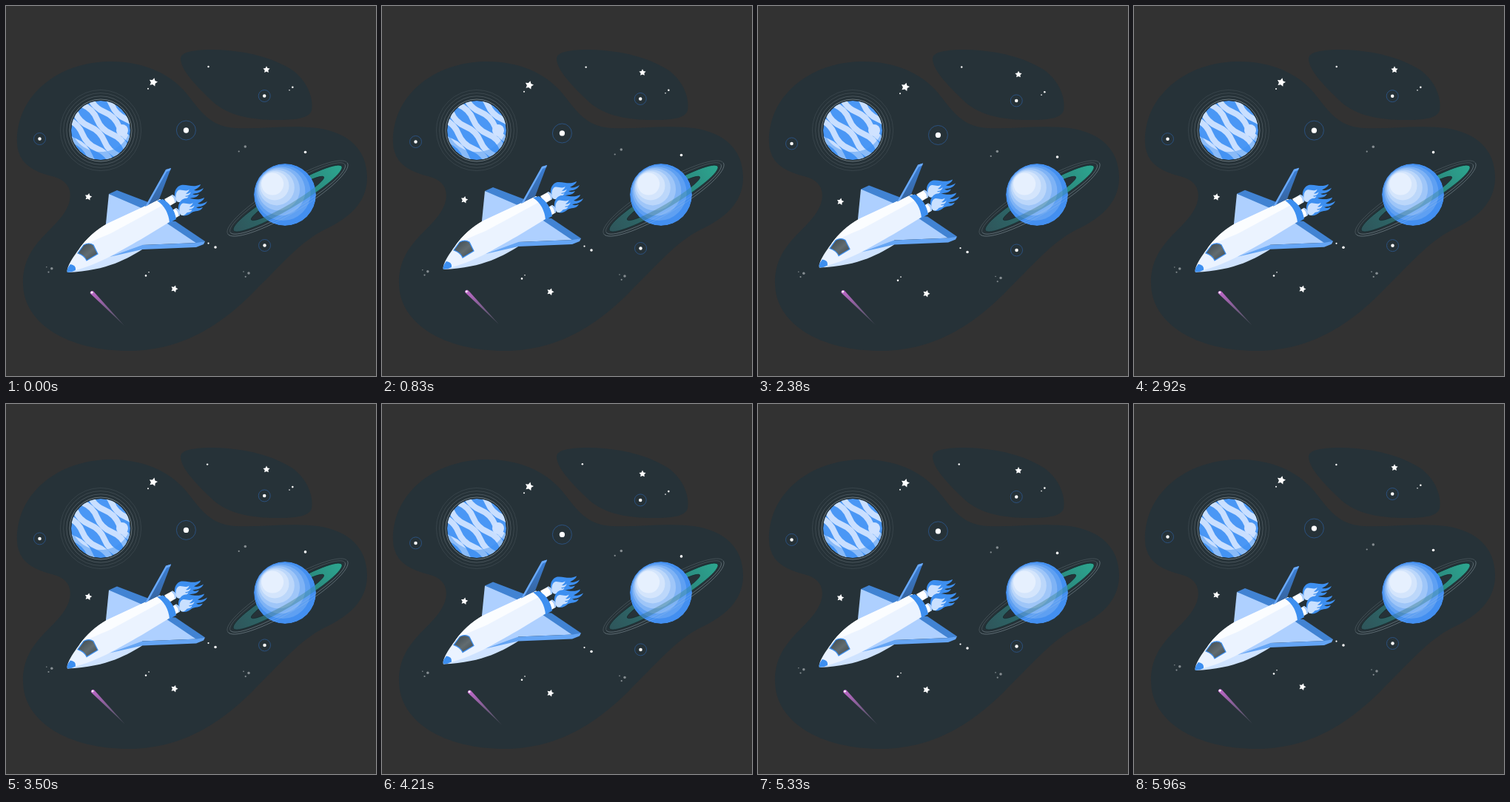
These frames come from a looping animation (500 px wide and 500 px high, 6000 ms). An HTML page:

```html
<!DOCTYPE html>
<html lang="en">
<head>
<meta charset="utf-8">
<title>Space shuttle</title>
<style>
html, body { margin: 0; width: 100%; height: 100%; overflow: hidden; background: #323232; }
svg { display: block; width: 100%; height: 100%; }
</style>
</head>
<body>
<svg viewBox="0 0 500 500">
  <defs>
    <clipPath id="disc"><circle r="40"/></clipPath>
    <clipPath id="ball"><circle r="42"/></clipPath>
    <clipPath id="front"><path d="M-100 0H100V40H-100Z"/></clipPath>
    <linearGradient id="ringFill"><stop stop-color="#2f555a"/><stop offset=".5" stop-color="#2b7472"/><stop offset="1" stop-color="#2ca68f"/></linearGradient>
    <linearGradient id="tail" gradientUnits="userSpaceOnUse" x1="116" y1="387" x2="160" y2="432">
      <stop stop-color="#bd68c8"/><stop offset=".5" stop-color="#8a649a" stop-opacity=".85"/><stop offset="1" stop-color="#8a7a9a" stop-opacity=".25"/>
    </linearGradient>
    <linearGradient id="glass" x2="1" y2="1"><stop stop-color="#39464d"/><stop offset=".55" stop-color="#626c70"/><stop offset="1" stop-color="#3d484e"/></linearGradient>
    <linearGradient id="finFill" x2="0" y2="1"><stop stop-color="#3b7fd6"/><stop offset="1" stop-color="#36639c"/></linearGradient>
    <path id="ringShape" fill-rule="evenodd" d="M-85 0A85 14 0 0 1 85 0A85 14 0 0 1 -85 0ZM-57 0A57 8 0 0 0 57 0A57 8 0 0 0 -57 0Z"/>
    <path id="fire" d="M0 0C-6 -8 -3 -20 6 -22C15 -23 22 -18 32 -23C31 -19 26 -17 23 -15C27 -14 31 -15 36 -18C33 -11 26 -11 21 -10C24 -8 27 -9 30 -10C26 -3 19 -6 15 -3C11 1 4 3 0 0Z"/>
    <g id="engine">
      <use href="#fire" fill="#3d8ff0" x="231" y="264"/>
      <use href="#fire" fill="#c9e0ff" transform="translate(231 264) scale(.52 .7)"/>
      <path fill="#fff" d="M214 261L225 255Q231 258 230 265L220 271Z"/>
      <path fill="#a9cdfd" d="M223 256L225 255Q231 258 230 265L228 266Q228 259 223 256Z"/>
    </g>
  </defs>

  <g fill="#263238">
    <path d="M15 185C13 125 65 77 138 75C186 74 222 92 243 117C261 139 274 163 310 165C346 167 382 160 421 165C463 171 488 194 488 232C488 267 461 288 431 302C398 318 371 351 340 381C299 424 244 466 166 466C86 466 23 431 23 374C23 317 73 302 85 267C91 247 82 235 62 230C33 223 16 210 15 185Z"/>
    <path d="M236 71C236 61 258 59 280 59C326 60 360 70 386 86C405 99 416 122 413 141C410 154 382 154 360 154C328 153 300 148 279 129C258 109 236 87 236 71Z"/>
  </g>

  <g transform="translate(128 168)">
    <g id="halo" fill="none" stroke="#c8d4dc" stroke-width=".6"></g>
    <g clip-path="url(#disc)">
      <circle r="40" fill="#4a97f5"/>
      <g id="bands" transform="rotate(45)" fill="none" stroke="#c9dfff" stroke-width="8"></g>
      <circle cx="29" cy="0" r="8" fill="#cfe2ff"/>
      <path fill="#3d8ff0" opacity=".45" d="M-40 0A40 40 0 0 0 40 0C34 19 17 30 -2 29C-21 28 -34 17 -40 0Z"/>
    </g>
  </g>

  <g transform="translate(380.5 260) rotate(-30.6)">
    <g fill="none" stroke="#a8b5ba" stroke-width=".5" opacity=".4">
      <ellipse rx="94" ry="20.7"/><ellipse rx="90" ry="17.5"/>
    </g>
    <use href="#ringShape" fill="url(#ringFill)" stroke="#172b2e" stroke-width=".8"/>
  </g>
  <g id="shading" transform="translate(377 255)" fill="#fff" clip-path="url(#ball)">
    <circle r="42" fill="#438ff0"/>
  </g>
  <g transform="translate(380.5 260) rotate(-30.6)" clip-path="url(#front)">
    <use href="#ringShape" fill="url(#ringFill)" opacity=".35"/>
    <g fill="none" stroke="#c9dde9" stroke-width=".5" opacity=".35"><ellipse rx="94" ry="20.7"/><ellipse rx="90" ry="17.5"/></g>
  </g>

  <g id="stars" fill="#fff"></g>
  <circle id="drifter" cx="273.5" cy="82" r="1.2" fill="#fff"/>
  <g id="comet">
    <path fill="url(#tail)" d="M113.8 388.5C113 385 117 384 119 386.5L160 432Z"/>
    <circle cx="116" cy="387.2" r="1.4" fill="#fff"/>
  </g>

  <g id="shuttle">
    <path fill="#aed0ff" d="M139 254L187 266L190 280L134 304Z"/>
    <path fill="#4183d3" d="M139 254L150 249L197 267L183 273Z"/>
    <path fill="#cfe3ff" d="M83 360L100 348L184 312V329C166 340 138 358 83 360Z"/>
    <path fill="#aed0ff" d="M213 288L259 320L184 323L140 339Z"/>
    <path fill="#4183d3" d="M212 290L229 291L269 318L258 321Z"/>
    <path fill="#65a5f4" d="M140 339L184 323L258 320L269 318L267 322L257 326L184 329Z"/>
    <use href="#engine"/>
    <use href="#engine" x="5" y="18"/>
    <path fill="#ebf3ff" d="M83 360C81 354 90 340 99 328C108 315 121 303 137 294L208 261Q223 268 229 287L183 315C151 333 123 351 83 360Z"/>
    <path fill="#fbfdff" d="M99 328C108 315 121 303 137 294L208 261L216 267L142 307C127 314 113 318 99 328Z"/>
    <path fill="#3d8ff0" d="M204 263L212 261Q227 270 230 288L221 293Q219 273 204 263Z"/>
    <path fill="url(#finFill)" d="M188 271L217 221L223 219L207 261Z"/>
    <path fill="#69a9fb" d="M188 271L216 221L223 219L222 222L217 224L192 269Z"/>
    <path fill="url(#glass)" stroke="#3d8ff0" stroke-width="1.2" d="M97 334L105 323Q112 319 118 323L124 335L109 344Q106 337 97 334Z"/>
    <path fill="#3d8ff0" d="M83 360Q81 356 87 349Q95 350 94 357Q89 360 83 360Z"/>
  </g>
</svg>
<script>
const get = id => document.getElementById(id);

function add(parent, tag, attrs) {
  const el = document.createElementNS('http://www.w3.org/2000/svg', tag);
  for (const key in attrs) el.setAttribute(key, attrs[key]);
  get(parent).append(el);
}

const dot = (cx, cy, r, fill = '#fff') => add('stars', 'circle', { cx, cy, r, fill });

function star(cx, cy, r, tilt) {
  const points = Array.from({ length: 10 }, (_, i) => {
    const a = (i * 36 + tilt - 90) * Math.PI / 180, d = i % 2 ? r * 0.52 : r;
    return [cx + d * Math.cos(a), cy + d * Math.sin(a)];
  });
  add('stars', 'polygon', { points: points.join(' ') });
}

function beacon(cx, cy, r) {
  add('stars', 'circle', { cx, cy, r, fill: 'none', stroke: '#2d5890', 'stroke-width': 0.8 });
  dot(cx, cy, r * 0.28);
}

function pair(x, y, dx, dy, r, fill) {
  dot(x, y, r, fill);
  dot(x + dx, y + dy, r * 1.6, fill);
}

function trio(x, y) {
  dot(x, y, 0.8, '#858d91');
  pair(x + 2.7, y + 6.8, 4.3, -4.8, 1.1, '#858d91');
}

star(199, 103, 6, 14);
star(352, 86, 4.8, 0);
star(111.3, 258, 5, 12);
star(227.5, 382.3, 5, 18);
beacon(45.5, 179.5, 8);
beacon(243.4, 168, 13);
beacon(349.2, 121.5, 8);
beacon(349.5, 323.5, 8);
pair(273.5, 320.7, 9.5, 5.3, 1.1);
pair(193, 359.7, -4, 4.7, 0.8);
pair(383, 113.7, 4.3, -4, 0.8);
pair(314.7, 196.5, 8.6, -6.5, 1.1, '#858d91');
trio(54.8, 352.8);
trio(321, 359);
dot(192, 111.8, 1);
dot(404.5, 197.5, 1.8);

// Thin halo, fading outwards
for (let i = 0; i < 4; i++) add('halo', 'circle', { r: 42 + i * 4.2, opacity: 0.7 / (1 + i) });

// Wavy cloud bands
for (let i = 0; i < 6; i++) {
  const y = i * 14 - 35, bend = i % 2 ? 6 : -6;
  add('bands', 'path', { d: `M-42 ${y}q14 ${bend} 28 0t28 0t28 0` });
}

// Nested light spots, shifted towards the upper left
for (let i = 1; i < 7; i++) {
  add('shading', 'circle', { cx: -2.8 * i, cy: -2.4 * i, r: 42 - 4.5 * i, opacity: 0.1 + 0.05 * i });
}

const clamp = v => Math.min(1, Math.max(0, v));
const ease = p => p * p * (3 - 2 * p);
const hump = (t, start, peak, end) =>
  ease(clamp((t - start) / (peak - start))) * ease(clamp((end - t) / (end - peak)));

const move = (id, x, y) => get(id).setAttribute('transform', `translate(${x} ${y})`);

function draw() {
  const t = performance.now() % 6000;
  const y = 10.2 * hump(t, 0, 1950, 3000) + 9.3 * hump(t, 3000, 4500, 6000);
  const sway = Math.sin(t / 3000 * Math.PI);
  move('stars', 0, y);
  move('shuttle', 0, -y);
  move('drifter', 2.8 * sway, 0.8 * sway);
  move('comet', -2.2 * sway, -1.8 * sway);
  requestAnimationFrame(draw);
}
draw();
</script>
</body>
</html>
```
